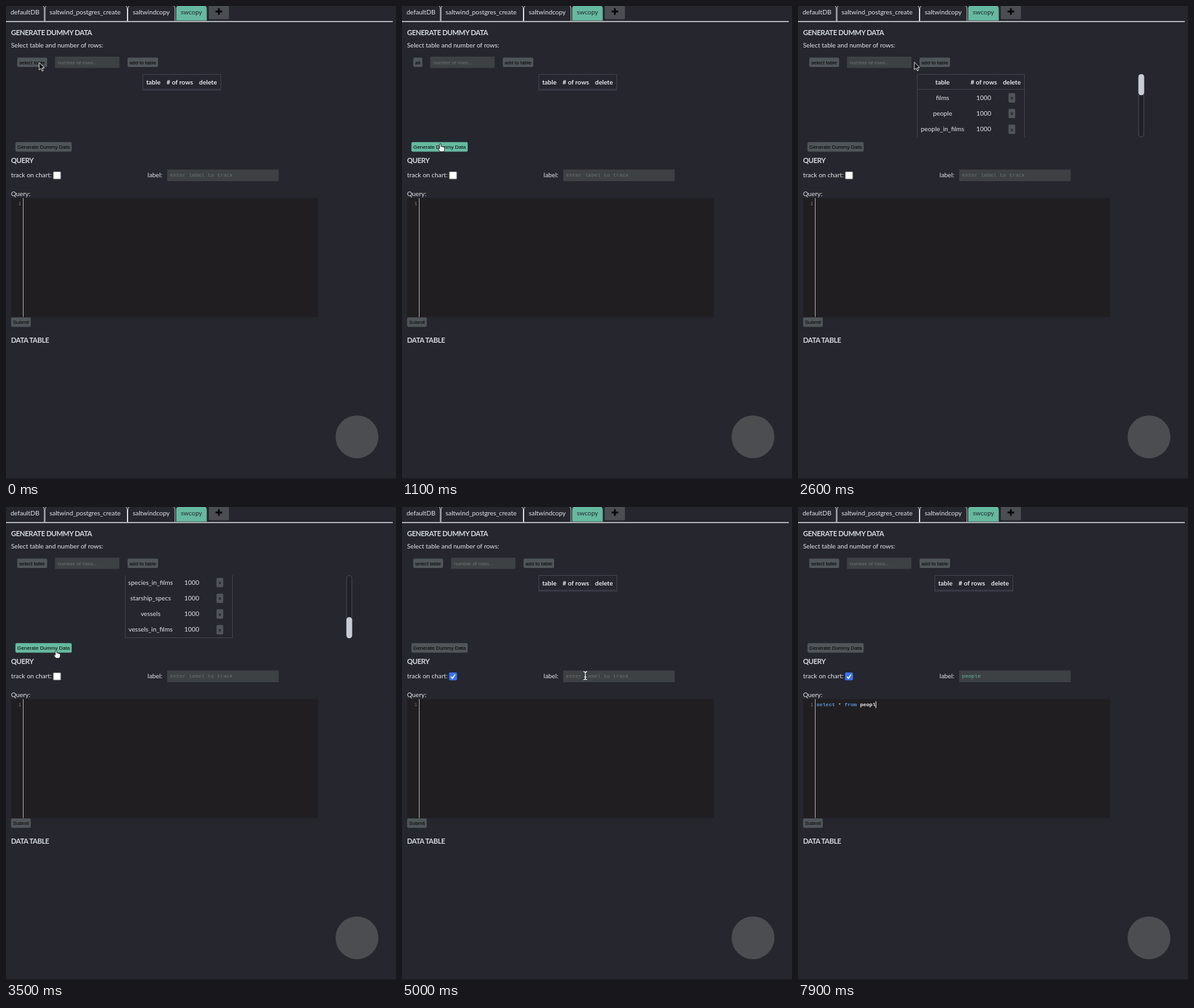
An HTML page for the animation above (8 s loop, 600x729 px).

```html
<!DOCTYPE html>
<html lang="en">
<head>
<meta charset="utf-8">
<title>Dummy data and query</title>
<style>
  html, body { margin: 0; width: 100%; height: 100%; overflow: hidden; background: #25262e; }
  svg { display: block; width: 600px; height: 729px; }
  text { font: 9.9px Lato, sans-serif; fill: #e4e6e9; white-space: pre; }
  .head { font-weight: 700; font-size: 10.9px; letter-spacing: -.42px; fill: #d3d8dc; }
  .bold { font-weight: 700; }
  .mid { text-anchor: middle; }
  .ui { font: 7.87px "Liberation Sans", Arial, sans-serif; fill: #000; }
  .mono { font: 8.05px "Liberation Mono", monospace; }
  .code { font: 700 8px "Liberation Mono", monospace; fill: #f2f2f2; }
  .btn { fill: #4f5559; }
  .hot { fill: #66b99f; }
  .field { fill: #3d4144; }
  .line { fill: none; stroke: #42444d; }
  .kw { fill: #5a96dc; }
  .op { fill: #a9a9a9; }
  .caret { fill: #f2f2f2; }
  .tab { fill: none; stroke: #d6d9da; }
  .tab.on { fill: #66b99f; stroke: #25262e; }
  .tab.on + text { fill: #25262e; }
</style>
</head>
<body>
<svg viewBox="0 0 600 729">
  <defs>
    <clipPath id="view"><rect x="180" y="105" width="360" height="97.3"/></clipPath>
    <path id="ibeam" d="M-2.8-6.2Q0-6.2 0-4Q0-6.2 2.8-6.2M0-4V4M-2.8 6.2Q0 6.2 0 4Q0 6.2 2.8 6.2M-1.6 2h3.2"/>
  </defs>
  <rect width="600" height="729" fill="#25262e"/>
  <rect y="728" width="600" height="1" fill="#17181d"/>

  <g id="tabs"></g>
  <rect x="312" y="-3" width="31" height="23.5" rx="2" fill="#4a4d52"/>
  <path d="M327.5 3.5v10M322.5 8.5h10" stroke="#08090b" stroke-width="2.8"/>
  <rect y="23.2" width="595" height="1.5" fill="#d6d9da"/>

  <text class="head" x="7.7" y="44.7">GENERATE DUMMY DATA</text>
  <text x="7.7" y="64.4">Select table and number of rows:</text>

  <rect id="pick" class="btn" x="17.3" y="79.5" height="14.5" rx="2"/>
  <text id="pickText" class="ui" x="20.2" y="89.6"></text>
  <g id="form">
    <rect class="field" x="75.3" y="78" width="99.2" height="17.5"/>
    <text id="rows" class="ui" x="79.8" y="89.6"></text>
    <rect id="rowsCaret" class="caret" x="79.6" y="82" width="1" height="9"/>
    <rect id="add" class="btn" x="187" y="79.5" width="47" height="14.5" rx="2"/>
    <text class="ui" x="190" y="89.6">add to table</text>
  </g>

  <g id="empty">
    <path class="line" d="M210.5 105.5h120v24.3h-120zM210.5 128.2h120"/>
    <text class="bold mid" x="226.7" y="120.5">table</text>
    <text class="bold mid" x="267.5" y="120.5"># of rows</text>
    <text class="bold mid" x="310.8" y="120.5">delete</text>
  </g>
  <g id="filled">
    <g clip-path="url(#view)"><g id="list">
      <path class="line" d="M183.5 105.5h165v290.5h-165zM183.5 128.5h165"/>
      <text class="bold mid" x="222.3" y="120.5">table</text>
      <text class="bold mid" x="285.8" y="120.5"># of rows</text>
      <text class="bold mid" x="329" y="120.5">delete</text>
    </g></g>
    <rect x="524" y="105.5" width="8" height="96.5" rx="4" fill="#202128" stroke="#4a4c53"/>
    <rect id="thumb" x="523.7" y="105" width="8.8" height="32.4" rx="4.2" fill="#c8ccd5"/>
  </g>

  <rect id="gen" class="btn" x="14.5" y="209.8" width="86.6" height="14.6" rx="2"/>
  <text class="ui" x="17.3" y="219.9">Generate Dummy Data</text>

  <text class="head" x="7.7" y="241.8">QUERY</text>
  <text x="7.7" y="264.2">track on chart:</text>
  <rect id="box" x="72.9" y="255.5" width="11.2" height="11.2" rx="1"/>
  <path id="tick" d="M75.4 261.4l2.2 2.7l4-5.8" fill="none" stroke="#fff" stroke-width="1.6"/>
  <text x="217.8" y="264.2">label:</text>
  <rect class="field" x="248" y="252" width="171.5" height="18"/>
  <text id="label" class="mono" x="252.3" y="263.4"></text>
  <rect id="labelCaret" class="caret" y="256.5" width="1" height="10"/>

  <text x="7.7" y="292.8">Query:</text>
  <rect x="7.8" y="296" width="472" height="183.3" fill="#201e20"/>
  <rect x="26" y="296" width="1" height="183.3" fill="#adadad"/>
  <text class="mono" x="18.7" y="306.8" style="fill:#77797c">1</text>
  <text id="code" class="code" x="28.2" y="306.8"></text>
  <rect id="codeCaret" class="caret" y="299.5" width="1" height="10.5"/>
  <rect class="btn" x="7.8" y="480" width="30.3" height="14.6" rx="2"/>
  <text class="ui" x="10.8" y="490.1">Submit</text>
  <text class="head" x="7.7" y="519">DATA TABLE</text>

  <circle cx="540" cy="664" r="33" fill="#4c4d51"/>

  <g id="menu"></g>
  <g id="cursor" stroke-linejoin="round">
    <path id="arrow" d="M0 0V11.6L2.7 9.2L4.6 13.3L6.4 12.5L4.6 8.5H8.1Z" fill="#0c0c0e" stroke="#f4f4f4" stroke-width=".9"/>
    <path id="hand" d="M-1.2 1Q0-.8 1.2 1V4.6Q2.6 3.9 3.2 5Q4.6 4.4 5 5.6Q6.5 5.2 6.6 6.8V9.2L5.4 12.6H-.3L-3.4 8.2Q-3.5 6.7-1.2 7.8Z" fill="#f6f6f6" stroke="#151518" stroke-width=".9"/>
    <g id="beam" fill="none">
      <use href="#ibeam" stroke="#111" stroke-width="2.8"/>
      <use href="#ibeam" stroke="#f4f4f4" stroke-width="1.4"/>
    </g>
  </g>
</svg>
<script>
const LOOP = 8000, STEP = 100;
const $ = id => document.getElementById(id);
const tables = ['films', 'people', 'people_in_films', 'pilots', 'planets', 'planets_in_films',
  'species', 'species_in_films', 'starship_specs', 'vessels', 'vessels_in_films'];
const query = 'select * from people';

// time, x, y
const path = [
  [200, 51, 87], [500, 32, 103], [700, 30, 103], [1000, 54, 193], [1100, 59, 212],
  [1200, 59, 215], [1400, 68, 87], [2000, 68, 87], [2200, 168, 87], [2400, 179, 86.5],
  [2700, 179, 86.5], [2900, 240, 150], [3200, 236, 154], [3500, 77, 220.5],
  [3800, 59.5, 219], [4200, 59.5, 219], [4500, 77, 259], [4600, 77, 260],
  [5000, 282, 260], [6000, 282, 260], [6300, 274, 316], [6400, 274, 316], [6600, 270, 268]
];
// time, characters shown
const rowKeys = [[1800, 2], [2000, 4]];
const labelKeys = [[5600, 1], [5700, 2], [5800, 4], [5900, 5], [6000, 6]];
const codeKeys = [[6700, 1], [6900, 2], [7000, 4], [7100, 6], [7200, 7], [7400, 9],
  [7500, 11], [7600, 13], [7700, 15], [7800, 17], [7900, 19]];

const within = (t, a, b) => t >= a && t < b;
const show = (id, on) => $(id).setAttribute('visibility', on ? 'inherit' : 'hidden');
const move = (id, x, y) => $(id).setAttribute('transform', `translate(${x} ${y})`);
const heat = (el, on) => el.setAttribute('class', on ? 'hot' : 'btn');
const typed = (keys, t) => keys.reduce((n, [at, len]) => t >= at ? len : n, 0);
const inside = ([x, y], l, t, r, b) => within(x, l, r) && within(y, t, b);

function pointAt(t) {
  const i = path.findIndex(p => p[0] > t);
  if (i < 1) return path[i ? path.length - 1 : 0].slice(1);
  const [a, b] = [path[i - 1], path[i]], k = (t - a[0]) / (b[0] - a[0]);
  return [1, 2].map(n => a[n] + (b[n] - a[n]) * k);
}

function build() {
  const tabs = [[-8, 59, 'defaultDB', 7], [60, 186.5, 'saltwind_postgres_create', 67],
    [187.5, 260, 'saltwindcopy', 195], [261.3, 309.3, 'swcopy', 269, true]];
  $('tabs').innerHTML = tabs.map(([l, r, name, x, on]) =>
    `<path class="tab${on ? ' on' : ''}" d="M${l} 23V5Q${l}-1 ${l + 5}-1H${r - 5}Q${r}-1 ${r} 5V23${on ? 'Z' : ''}"/>
     <text x="${x}" y="13.2">${name}</text>`).join('');
  $('list').innerHTML += tables.map((name, i) => {
    const y = 141.3 + i * 24.2;
    return `<text class="mid" x="222.4" y="${y + 3.3}">${name}</text>
      <text class="mid" x="285.8" y="${y + 3.3}">1000</text>
      <rect class="btn" x="323.8" y="${y - 7}" width="10.4" height="14.6" rx="2"/>
      <text class="ui mid" x="329" y="${y + 2.9}">x</text>`;
  }).join('');
  $('menu').innerHTML = ['all', ...tables].map((name, i) => {
    const y = 95 + i * 18.4;
    return `<rect class="btn" x="17.3" y="${y}" width="66" height="18"/>
      <text class="ui" x="20.2" y="${y + 11.7}">${name}</text>`;
  }).join('');
}

const paint = word => /^(select|from)$/.test(word) ? `<tspan class="kw">${word}</tspan>`
  : word === '*' ? `<tspan class="op">*</tspan>` : word;

function fillField(id, value, hint) {
  $(id).textContent = value || hint;
  $(id).style.fill = value ? '#66b99f' : '#6c7274';
}

function draw(t) {
  const at = pointAt(t);
  const all = within(t, 700, 2400), open = within(t, 300, 700);
  const filled = within(t, 2400, 3800);

  $('pick').setAttribute('width', all ? 14 : 46);
  $('pickText').textContent = all ? 'all' : 'select table';
  move('form', all ? -32 : 0, 0);
  show('menu', open);
  const overAll = open && inside(at, 17, 95, 83, 113);
  heat($('menu').firstElementChild, overAll);

  fillField('rows', all ? '1000'.slice(0, typed(rowKeys, t)) : '', 'number of rows...');
  show('rowsCaret', within(t, 1400, 1600));
  const overAdd = all && inside(at, 155, 79, 202, 94);
  heat($('add'), overAdd);

  show('empty', !filled);
  show('filled', filled);
  const scroll = 194.5 * Math.min(1, Math.max(0, (t - 2900) / 300));
  move('list', 0, -scroll);
  move('thumb', 0, scroll / 3);

  const overGen = inside(at, 14, 209, 101, 224.5);
  heat($('gen'), overGen);

  const checked = t >= 4600;
  $('box').setAttribute('fill', checked ? '#3b72f0' : '#fff');
  $('box').setAttribute('stroke', checked ? '#3b72f0' : '#858585');
  show('tick', checked);

  const chars = typed(labelKeys, t);
  fillField('label', 'people'.slice(0, chars), 'enter label to track');
  $('labelCaret').setAttribute('x', 252 + chars * 4.83);
  show('labelCaret', within(t, 5100, 5400) || within(t, 5600, 6200));

  const len = typed(codeKeys, t);
  $('code').innerHTML = query.slice(0, len).split(' ').map(paint).join(' ');
  $('codeCaret').setAttribute('x', 28.2 + len * 4.8);
  show('codeCaret', t >= 6300);

  const hand = overAll || overAdd || overGen;
  const beam = !hand && (within(t, 1400, 2100) || t >= 6300 || inside(at, 248, 252, 419, 270));
  move('cursor', ...at);
  show('cursor', t < 6700);
  show('hand', hand);
  show('beam', beam);
  show('arrow', !hand && !beam);
}

const start = performance.now();
function tick() {
  const t = (performance.now() - start) % LOOP;
  draw(Math.floor(t / STEP) * STEP);
  requestAnimationFrame(tick);
}
build();
tick();
</script>
</body>
</html>
```
